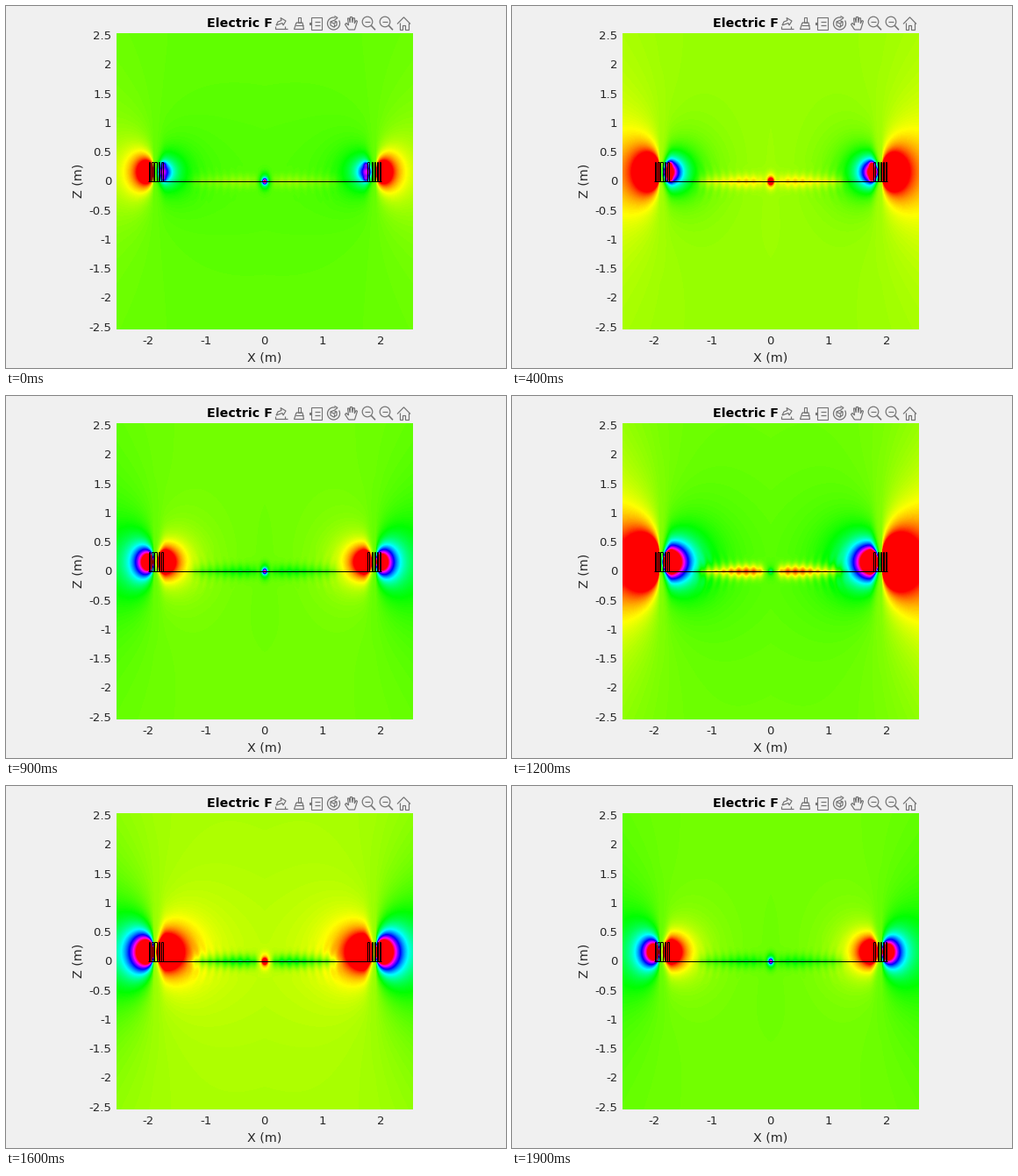
Animation of 570x413 px, one loop 2 s. Source, as a matplotlib script:

```python
import numpy as np
import matplotlib.pyplot as plt
from matplotlib.animation import FuncAnimation
from matplotlib.colors import LinearSegmentedColormap
from matplotlib.patches import Arc, Circle, Rectangle

W, H, DPI = 570, 413, 100
FRAMES, PERIOD = 20, 10
SCALE = 66.5                      # pixels per metre
CX, CY = 295, 200                 # pixel position of the origin
LEFT, RIGHT, TOP, BOTTOM = 126, 464, 31, 369
INK, ICON = "#262626", "#737373"

plt.rcParams["font.family"] = "DejaVu Sans"
fig = plt.figure(figsize=(W / DPI, H / DPI), dpi=DPI, facecolor="#f0f0f0")
ax = fig.add_axes([0, 0, 1, 1])
ax.axis("off")

hues = LinearSegmentedColormap.from_list(
    "hues", ["#ff0000", "#ffff00", "#00ff00", "#00ffff",
             "#0000ff", "#ff00ff", "#ff0006"], N=256)

# Field grid, one sample per pixel
px = np.arange(LEFT, RIGHT) + 0.5
py = np.arange(TOP, BOTTOM) + 0.5
x, z = np.meshgrid((px - CX) / SCALE, (CY - py) / SCALE)
rho = np.abs(x)


def gauss(dx, dz, sx, sz):
    return np.exp(-(dx / sx) ** 2 - (dz / sz) ** 2)


def smooth(t):
    t = np.clip(t, 0, 1)
    return t * t * (3 - 2 * t)


def coil_field():
    """Radial field of the ring coil: negative outside, positive inside."""
    d, dz = rho - 1.9, z - 0.16
    out = 0.118 * d / (d ** 2 + (0.85 * dz) ** 2 + 0.010) ** 1.5
    inn = 0.165 * np.exp(d) * -d / (d ** 2 + (1.15 * dz) ** 2 + 0.0144) ** 1.5
    inn = inn * smooth(-d / 0.21)
    spots = gauss(rho - 1.74, z - 0.29, 0.045, 0.045)
    spots += gauss(rho - 1.74, z - 0.04, 0.045, 0.045)
    far = 0.045 * (rho / 2.54) ** 3 / (1 + (dz / 2) ** 2)
    return np.where(d > 0, -out, inn) + 0.8 * spots - far


def disk_field():
    """Ripples hugging the flat winding, curved around the coil."""
    window = smooth((rho - 0.03) / 0.2) * smooth((1.4 - rho) / 0.35)
    ripple = np.cos(2 * np.pi * np.hypot(rho - 1.85, z) / 0.13)
    height = np.abs(z)
    level = 0.10 + 0.06 * gauss(rho - 0.45, 0, 0.3, 1)
    sheet = level * np.exp(-(height / 0.12) ** 2)
    sheet += 0.09 * np.exp(-height / 0.025)
    rays = 0.025 * ripple * np.exp(-(height / (0.08 + 0.17 * rho)) ** 2)
    return -window * (sheet + rays)


coil = coil_field() + disk_field()
core = 0.58 * gauss(x, z, 0.04, 0.05) + 0.16 * gauss(x, z, 0.08, 0.13)
glow = gauss(x, z, 1.5, 1.5)


def field(n):
    phase = 2 * np.pi * (n % PERIOD) / PERIOD
    wave = np.cos(phase - np.radians(79)) + 0.04
    drift = np.cos(phase - np.radians(22))
    return (0.248 + 0.024 * drift + 0.009 * glow * drift
            + coil * wave + core * np.cos(phase + np.radians(8)))


image = ax.imshow(field(0), cmap=hues, vmin=0, vmax=1,
                  extent=(LEFT, RIGHT, BOTTOM, TOP),
                  interpolation="nearest", aspect="auto", zorder=1)
ax.set_xlim(0, W)
ax.set_ylim(H, 0)


def line(points, color="black", width=1.0, snap=None):
    xs, ys = zip(*points)
    ax.plot(xs, ys, color=color, lw=width * 72 / DPI, zorder=3,
            solid_capstyle="butt", solid_joinstyle="miter", snap=snap)


def text(xp, yp, s, size, **kw):
    kw = {"color": INK, "ha": "center", "va": "baseline", **kw}
    ax.text(xp, yp, s, fontsize=size * 72 / DPI, zorder=4, **kw)


# Winding and coil cross-sections
line([(162, 199.5), (428, 199.5)], snap=True)
for turns in ((162.5, 163.5, 165.5, 167.5, 168.5,
               171.5, 173.5, 174.5, 176.5, 178.5),
              (411.5, 413.5, 416.5, 417.5, 419.5,
               420.5, 422.5, 423.5, 425.5, 426.5)):
    for xt in turns:
        line([(xt, 177.5), (xt, 199.5)], snap=True)
    for a, b in zip(turns[::2], turns[1::2]):
        line([(a, 177.5), (b, 177.5)], snap=True)

# Labels
text(229, 23.6, "Electric F", 14.2, weight="bold", color="black", ha="left")
for k in range(-5, 6):
    text(120.5, CY - k * SCALE / 2 + 4.4, f"{k / 2:g}", 13.3, ha="right")
for k in range(-2, 3):
    text(CX + k * SCALE - 0.3, 386, f"{k}", 13.3)
text(CX, 405.4, "X (m)", 14.3)
text(83, 199.5, "Z (m)", 14.3, rotation=90, va="center")


# Toolbar icons
def stroke(points, width=1.2):
    line(points, ICON, width)


def ring(xc, yc, r, width=1.2):
    ax.add_patch(Circle((xc, yc), r, fill=False, ec=ICON,
                        lw=width * 72 / DPI, zorder=3))


def box(xb, yb, w, h, fill=False):
    ax.add_patch(Rectangle((xb, yb), w, h, fill=fill, fc=ICON, ec=ICON,
                           lw=0.8, zorder=3))


def export_icon(c):
    stroke([(c - 6, 23), (c - 6, 25.5), (c + 5, 25.5), (c + 5, 23)])
    stroke([(c - 5, 22), (c - 3, 18), (c + 1, 16.5), (c, 13.5),
            (c + 6, 17), (c + 3, 22), (c + 2, 19.5), (c - 5, 22)])
    stroke([(c + 5, 26), (c + 8, 26)])


def brush_icon(c):
    box(c - 1, 12.5, 3, 6)
    stroke([(c - 3, 19), (c + 4, 19), (c + 5.5, 26.5),
            (c - 5.5, 26.5), (c - 3, 19)])
    stroke([(c - 4, 22), (c + 4.5, 22)])


def tips_icon(c):
    box(c - 5.5, 13, 12, 14)
    stroke([(c - 2, 17.5), (c + 4, 17.5)])
    stroke([(c - 2, 22), (c + 4, 22)])
    box(c - 7.2, 19, 2, 2, True)


def rotate_icon(c):
    ax.add_patch(Arc((c, 20), 14, 14, theta1=-30, theta2=285,
                     ec=ICON, lw=0.9, zorder=3))
    stroke([(c + 1, 11.5), (c + 4.5, 13.5), (c + 1, 16)])
    stroke([(c, 16.5), (c + 3.5, 18), (c + 3.5, 22), (c, 24),
            (c - 3.5, 22), (c - 3.5, 18), (c, 16.5)])
    stroke([(c - 3.5, 18), (c, 20), (c + 3.5, 18)])
    stroke([(c, 20), (c, 24)])


def hand_icon(c):
    stroke([(c - 3, 27), (c - 7, 21), (c - 5.5, 19.5), (c - 3, 22),
            (c - 4, 14), (c - 2.3, 14), (c - 1.3, 19), (c - 1, 12.5),
            (c + 1, 12.5), (c + 1.2, 19), (c + 2.3, 13.5), (c + 4, 14),
            (c + 3.8, 20), (c + 5.5, 16.5), (c + 7, 17.3),
            (c + 4, 27), (c - 3, 27)])


def zoom_icon(c):
    ring(c - 1.5, 18, 5.8)
    stroke([(c + 2.8, 22.3), (c + 7.5, 27.3)], 1.6)
    stroke([(c - 4.5, 18), (c + 1.5, 18)])


def home_icon(c):
    stroke([(c - 7.5, 20.5), (c, 12.8), (c + 7.5, 20.5)])
    stroke([(c - 5, 19), (c - 5, 27), (c - 1.7, 27), (c - 1.7, 22),
            (c + 1.7, 22), (c + 1.7, 27), (c + 5, 27), (c + 5, 19)])


export_icon(313)
brush_icon(334)
tips_icon(353.5)
rotate_icon(373.5)
hand_icon(393.5)
zoom_icon(413.5)
zoom_icon(433.5)
home_icon(453.5)


def draw(n):
    image.set_data(field(n))
    return (image,)


anim = FuncAnimation(fig, draw, frames=FRAMES, interval=100,
                     repeat=True, repeat_delay=0, blit=False)
plt.show()
```
